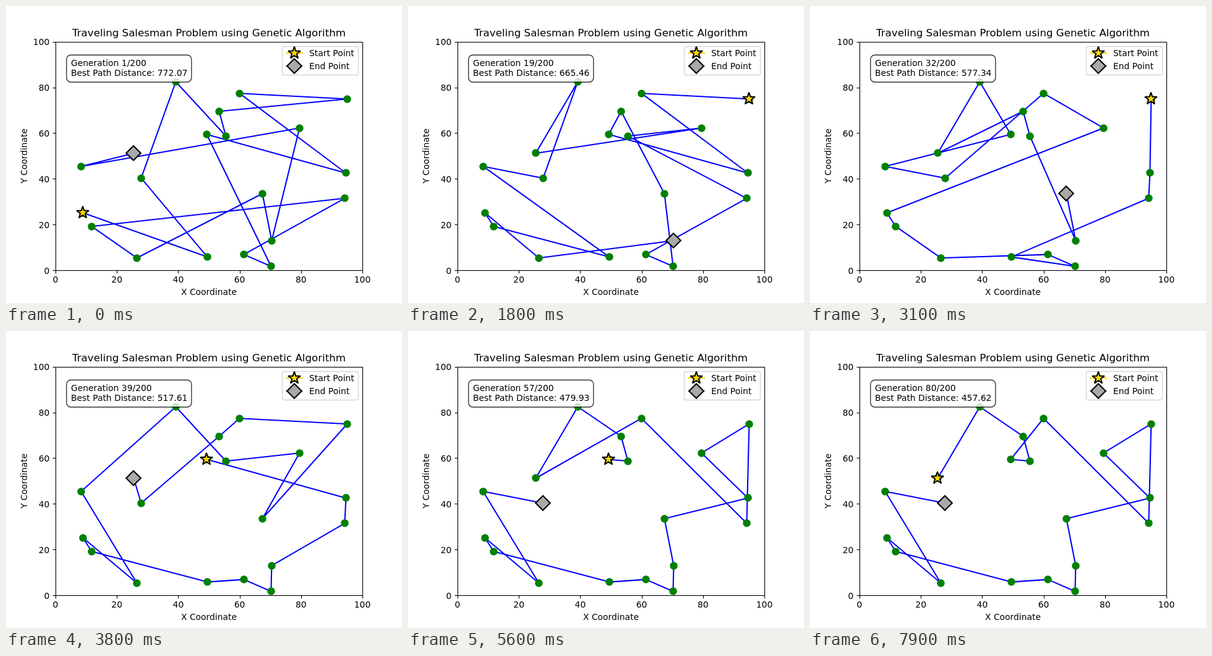
An HTML page with a canvas that plays this animation: 640 by 480 pixels, repeating every 8000 ms.

```html
<!DOCTYPE html>
<html lang="en">
<head>
<meta charset="utf-8">
<title>Traveling Salesman Problem using Genetic Algorithm</title>
<style>
html, body { margin: 0; width: 100%; height: 100%; overflow: hidden; background: #fff; }
canvas { display: block; }
</style>
</head>
<body>
<canvas id="plot" width="640" height="480"></canvas>
<script>
const ctx = document.getElementById('plot').getContext('2d');
const FONT = '"DejaVu Sans", Verdana, sans-serif';
const PT = 100 / 72;
const LOOP = 8000, STEP = 100;
const AXES = { x: 80, y: 57.6, w: 496, h: 369.6 };

// City positions in pixels, keyed by letter
const cities = {
  A: [124, 334], B: [138, 356], C: [211, 407], D: [325, 405.4], E: [384, 401.4],
  F: [428, 420.6], G: [429, 379], H: [414, 303], I: [547, 310.6], J: [549, 269.8],
  K: [551, 150], L: [474, 197], M: [377, 141], N: [344, 170], O: [355, 210],
  P: [324, 207.3], Q: [274, 122.3], R: [206, 237.8], S: [218, 278], T: [121, 259]
};

// Best tour from each moment on
const tours = [
  { from: 0, route: 'ADSQONKMJPFEIBCHGLTR', length: '772.07' },
  { from: 700, route: 'KMJPNHFEIOLRQSTDBACG', length: '665.46' },
  { from: 1900, route: 'KJIDFECBALMSTPQRNOGH', length: '577.34' },
  { from: 3700, route: 'PJIGFEDBACTQOLHKMNSR', length: '517.61' },
  { from: 4200, route: 'STCABGFEDLMNQKJIHPOR', length: '503.00' },
  { from: 5500, route: 'PONQRMIKLJHGFEDBACTS', length: '479.93' },
  { from: 6100, route: 'RQNOPMIKLJHGFEDBACTS', length: '457.62' }
];

function text(str, x, y, align = 'left', size = 10) {
  ctx.font = `${size * PT}px ${FONT}`;
  ctx.textAlign = align;
  ctx.textBaseline = 'alphabetic';
  ctx.fillStyle = '#000';
  ctx.fillText(str, x, y);
}

function polyline(points, color, width) {
  ctx.beginPath();
  points.forEach(([x, y]) => ctx.lineTo(x, y));
  ctx.strokeStyle = color;
  ctx.lineWidth = width;
  ctx.stroke();
}

function marker(points, fill, join) {
  ctx.beginPath();
  points.forEach(([x, y]) => ctx.lineTo(x, y));
  ctx.closePath();
  ctx.fillStyle = fill;
  ctx.fill();
  ctx.strokeStyle = '#000';
  ctx.lineWidth = 1.5 * PT;
  ctx.lineJoin = join;
  ctx.stroke();
}

function star(x, y) {
  const points = Array.from({ length: 10 }, (_, i) => {
    const r = 7.5 * PT * (i % 2 ? 0.382 : 1);
    const a = i * Math.PI / 5;
    return [x + r * Math.sin(a), y - r * Math.cos(a)];
  });
  marker(points, '#ffd700', 'bevel');
}

function diamond(x, y) {
  const r = 6 * PT * Math.SQRT2;
  marker([[x, y - r], [x + r, y], [x, y + r], [x - r, y]], '#a9a9a9', 'miter');
}

function dot([x, y]) {
  ctx.beginPath();
  ctx.arc(Math.floor(x) + 0.5, Math.floor(y) + 0.5, 4.5 * PT, 0, 2 * Math.PI);
  ctx.fillStyle = '#008000';
  ctx.fill();
}

function panel(x, y, w, h, r, edge, width) {
  ctx.save();
  ctx.globalAlpha = 0.8;
  ctx.beginPath();
  ctx.roundRect(x, y, w, h, r);
  ctx.fillStyle = '#fff';
  ctx.fill();
  ctx.strokeStyle = edge;
  ctx.lineWidth = width;
  ctx.stroke();
  ctx.restore();
}

function drawTour(route) {
  const points = [...route].map(c => cities[c]);
  ctx.save();
  ctx.beginPath();
  ctx.rect(AXES.x, AXES.y, AXES.w, AXES.h);
  ctx.clip();
  ctx.lineJoin = 'round';
  polyline(points.map(([x, y]) => [x + 0.4, y + 0.2]), '#00f', 1.5 * PT);
  points.forEach(dot);
  star(...points[0]);
  diamond(...points[points.length - 1]);
  ctx.restore();
}

function drawAxes() {
  const snap = v => Math.floor(v + 0.5) + 0.5;
  for (let i = 0; i <= 5; i++) {
    const x = AXES.x + AXES.w * i / 5;
    const y = AXES.y + AXES.h * (1 - i / 5);
    polyline([[snap(x), 427.5], [snap(x), 432.4]], '#000', 0.8 * PT);
    polyline([[80.5, snap(y)], [75.6, snap(y)]], '#000', 0.8 * PT);
    text(i * 20, x, 447, 'center');
    text(i * 20, 70.3, Math.round(y + 5.35), 'right');
  }
  ctx.strokeStyle = '#000';
  ctx.lineWidth = 0.8 * PT;
  ctx.lineJoin = 'miter';
  ctx.strokeRect(80.5, 58.5, 496, 369);
  text('X Coordinate', 328, 467, 'center');
  ctx.save();
  ctx.translate(34, 242.4);
  ctx.rotate(-Math.PI / 2);
  text('Y Coordinate', 0, 0, 'center');
  ctx.restore();
  text('Traveling Salesman Problem using Genetic Algorithm', 328, 49, 'center', 12);
}

function drawLegend() {
  panel(446.5, 65.5, 123, 46, 2.8, '#ccc', PT);
  polyline([[452, 76], [480, 76]], '#ffd700', 1.5 * PT);
  star(466, 76);
  text('Start Point', 490, 81);
  polyline([[452, 97], [480, 97]], '#a9a9a9', 1.5 * PT);
  diamond(466, 97);
  text('End Point', 490, 102);
}

function draw(now) {
  const t = now % LOOP;
  const tour = tours.filter(k => k.from <= t).pop();
  const generation = Math.floor(t / STEP) + 1;
  ctx.fillStyle = '#fff';
  ctx.fillRect(0, 0, 640, 480);
  drawTour(tour.route);
  drawAxes();
  panel(97.8, 79.3, 202, 43.7, 6.9, '#000', PT);
  text(`Generation ${generation}/200`, 105, 97);
  text(`Best Path Distance: ${tour.length}`, 105, 113);
  drawLegend();
}

const began = performance.now();
function tick() {
  draw(performance.now() - began);
  requestAnimationFrame(tick);
}
tick();
</script>
</body>
</html>
```
